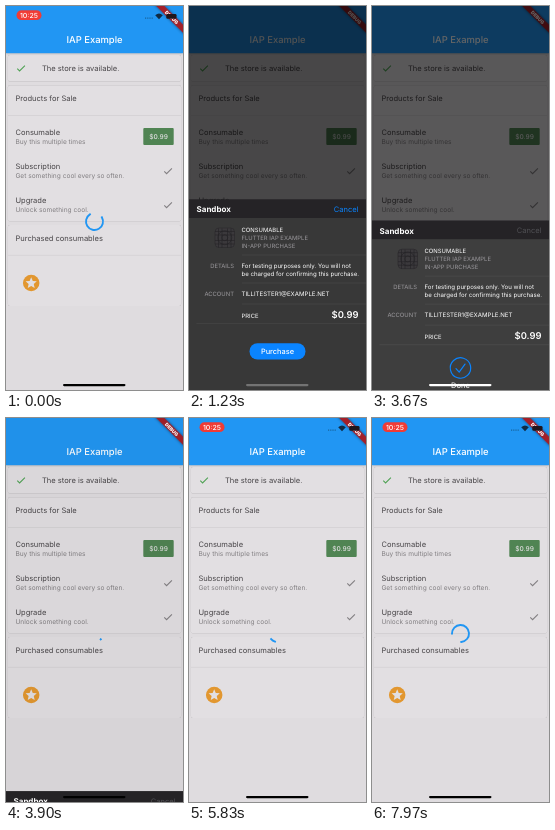
Recreate the animation shown at these times as an HTML page. Size 177 by 384 pixels, loop 8 s.

```html
<!DOCTYPE html>
<html lang="en">
<head>
<meta charset="utf-8">
<title>IAP Example</title>
<style>
  html, body { margin: 0; width: 100%; height: 100%; overflow: hidden; background: #fafafa; }
  svg { display: block; width: 100%; height: 100%; }
  text { font-family: Inter, Roboto, sans-serif; text-rendering: geometricPrecision; }
  .card { fill: #fff; filter: drop-shadow(0 .6px .7px rgba(0, 0, 0, .38)); }
  .title { font-size: 7.55px; fill: #222; }
  .sub { font-size: 6.6px; fill: #757575; }
  .rule { stroke: #dcdcdc; stroke-width: .5; }
  .tick { fill: none; }
  .sheet { font-size: 6.1px; fill: #fff; }
  .caps { font-size: 5.9px; fill: #fff; }
  .dim { fill: #9a989c; }
  .line { stroke: #fff; stroke-opacity: .1; stroke-width: .5; }
  .end { text-anchor: end; }
  .mid { text-anchor: middle; }
</style>
</head>
<body>
<svg viewBox="0 0 177 384">
  <defs>
    <path id="check" d="M4.1 12.7 9 17.6 20.3 6.3" transform="scale(.472) translate(-12 -12)" stroke-width="2.3"/>
  </defs>

  <rect width="177" height="384" fill="#fafafa"/>
  <rect class="card" x="1.9" y="49.1" width="173.2" height="26.4" rx="1.9"/>
  <rect class="card" x="1.9" y="79.3" width="173.2" height="136" rx="1.9"/>
  <rect class="card" x="1.9" y="219" width="173.2" height="81" rx="1.9"/>

  <use href="#check" class="tick" x="15" y="62.3" stroke="#2fa836"/>
  <text class="title" x="36" y="65">The store is available.</text>
  <text class="title" x="9.4" y="95.4">Products for Sale</text>
  <path class="rule" d="M2 109.5H175M2 249.3H175"/>
  <text class="title" x="9.4" y="128.7">Consumable</text>
  <text class="sub" x="9.4" y="137.9">Buy this multiple times</text>
  <text class="title" x="9.4" y="162.7">Subscription</text>
  <text class="sub" x="9.4" y="171.9">Get something cool every so often.</text>
  <text class="title" x="9.4" y="196.7">Upgrade</text>
  <text class="sub" x="9.4" y="205.9">Unlock something cool.</text>
  <rect x="137.3" y="122" width="30.4" height="17" rx="1" fill="#2e7d32"/>
  <text class="mid" x="152.5" y="132.9" font-size="6.6" font-weight="500" fill="#fff">$0.99</text>
  <use href="#check" class="tick" x="162" y="165" stroke="#777"/>
  <use href="#check" class="tick" x="162" y="199" stroke="#777"/>
  <text class="title" x="9.4" y="235.4">Purchased consumables</text>
  <g transform="translate(15.3 267.1) scale(.825)">
    <circle cx="12" cy="12" r="10" fill="#ff9800"/>
    <path fill="#fff" d="M16.2 18 12 15.5 7.8 18l1.1-4.8L5.2 10l4.9-.4L12 5l1.9 4.5 4.9.4-3.7 3.3z"/>
  </g>
  <rect y="47.2" width="177" height="337" fill="#9e969e" fill-opacity=".3"/>
  <path id="spinner" fill="none" stroke="#2196f3" stroke-width="1.9" stroke-linecap="square"/>

  <rect width="177" height="47.2" fill="#2196f3" style="filter:drop-shadow(0 .7px 1px rgba(0,0,0,.3))"/>
  <text class="mid" x="88.5" y="37.4" font-size="9.44" font-weight="500" fill="#fff">IAP Example</text>
  <g transform="translate(177 0) rotate(45)">
    <rect x="-22" y="13.2" width="44" height="5.7" fill="#a51f28" style="filter:drop-shadow(0 0 1.4px rgba(0,0,0,.5))"/>
    <text class="mid" y="17.8" font-size="4.8" font-weight="900" fill="#fff">DEBUG</text>
  </g>
  <g id="status">
    <rect x="10.5" y="4.3" width="25" height="9.8" rx="4.9" fill="#f13b35"/>
    <text class="mid" x="23" y="11.7" font-size="7" font-weight="500" fill="#fff">10:25</text>
    <path d="M139 12.2H147" stroke="#17649f" stroke-width="1.2" stroke-dasharray="1.2 1"/>
    <path d="M149.2 9.3Q153 5.8 156.8 9.3L153 13.2Z" fill="#102b43"/>
    <rect x="160.3" y="8" width="10.2" height="4.8" rx="1.3" fill="#20151c"/>
  </g>

  <rect id="shade" width="177" height="384"/>

  <g id="sheet">
    <rect id="panel" y="211" width="177" height="175"/>
    <rect y="192.8" width="177" height="18.7" fill="#252326"/>
    <path class="line" d="M53 248.5H177M53 276.5H177M53 297.5H177M7.5 317H177"/>
    <text x="7.5" y="205.9" font-size="8" font-weight="700" fill="#fff">Sandbox</text>
    <text id="cancel" class="end" x="169.5" y="205.7" font-size="7.55">Cancel</text>
    <rect x="26" y="221.5" width="19.5" height="19.5" rx="4" fill="#3b393c" stroke="#29272a" stroke-width=".6"/>
    <g fill="none" stroke="#242225" stroke-width=".6">
      <path d="M29.5 222V241M33 222V241M38.5 222V241M42 222V241M26 225H45.5M26 228.5H45.5M26 234H45.5M26 237.5H45.5"/>
      <circle cx="35.75" cy="231.25" r="3"/><circle cx="35.75" cy="231.25" r="7"/>
    </g>
    <text class="caps" x="52.5" y="225.4">CONSUMABLE</text>
    <text class="caps dim" x="52.5" y="233.4">FLUTTER IAP EXAMPLE</text>
    <text class="caps dim" x="52.5" y="241.2">IN-APP PURCHASE</text>
    <text class="caps dim end" x="45" y="261.5">DETAILS</text>
    <text class="sheet" x="52.5" y="261.5">For testing purposes only. You will not</text>
    <text class="sheet" x="52.5" y="269.4">be charged for confirming this purchase.</text>
    <text class="caps dim end" x="45" y="289.5">ACCOUNT</text>
    <text class="sheet" x="52.5" y="289.5">TILLITESTER1@EXAMPLE.NET</text>
    <text class="caps" x="52.5" y="311.3">PRICE</text>
    <text class="end" x="169.5" y="311.6" font-size="9.4" font-weight="600" fill="#fff">$0.99</text>
    <g id="button">
      <rect x="60.5" y="336.7" width="56" height="16.3" rx="8" fill="#0a84ff"/>
      <text class="mid" x="88.5" y="347.5" font-size="7.4" font-weight="500" fill="#fff">Purchase</text>
    </g>
    <g fill="none" stroke="#0a84ff" stroke-width="1.2" stroke-linecap="round">
      <path id="ring"/>
      <path id="tick" d="M84 341 87.2 344.5 93 336.4" pathLength="1" stroke-dasharray="1 2"/>
    </g>
    <text id="done" class="mid" x="88.5" y="360.3" font-size="7.55" fill="#fff">Done</text>
  </g>
  <rect id="home" x="57" y="377.9" width="62.5" height="2.3" rx="1.15"/>
</svg>
<script>
const LOOP = 8000, OPEN = 775, CLOSE = 3639, TAP = 1700;
const FREEZE = 712, RESUME = 4350, CYCLE = 1333;
const el = id => document.getElementById(id);
const set = (id, attributes) => {
  for (const name in attributes) el(id).setAttribute(name, attributes[name]);
};
const clamp = x => Math.min(1, Math.max(0, x));
const ramp = (t, a, b) => clamp((t - a) / (b - a));
const mix = (a, b, k) => a + (b - a) * k;
const grey = v => `rgb(${v},${v},${v})`;

// Critically damped spring, 0 to 1.
function spring(ms) {
  const x = Math.max(0, ms) * .018;
  return 1 - (1 + x) * Math.exp(-x);
}

// cubic-bezier(.4, 0, .2, 1)
function fastOutSlowIn(x) {
  x = clamp(x);
  let lo = 0, hi = 1, s = .5;
  for (let i = 0; i < 18; i++) {
    s = (lo + hi) / 2;
    const bx = 1.2 * s * (1 - s) ** 2 + .6 * s * s * (1 - s) + s ** 3;
    if (bx < x) lo = s; else hi = s;
  }
  return 3 * s * s * (1 - s) + s ** 3;
}

function arc(cx, cy, r, start, sweep) {
  const point = deg => {
    const a = deg * Math.PI / 180;
    return `${cx + r * Math.cos(a)} ${cy + r * Math.sin(a)}`;
  };
  return `M${point(start)}A${r} ${r} 0 ${sweep > 180 ? 1 : 0} 1 ${point(start + sweep)}`;
}

function drawSpinner(t) {
  const time = t > FREEZE && t < RESUME ? FREEZE : t;
  const phase = 3.431 + time / CYCLE;
  const step = Math.floor(phase) % 5, u = phase % 1;
  const head = fastOutSlowIn(u * 2), tail = fastOutSlowIn(u * 2 - 1);
  const start = -90 + tail * 270 + u * 306 - step * 144;
  set('spinner', { d: arc(88.5, 215.5, 8.5, start, Math.max(.3, (head - tail) * 270)) });
}

function drawSheet(t) {
  const shown = t < CLOSE ? spring(t - OPEN) : 1 - spring(t - CLOSE);
  set('sheet', {
    transform: `translate(0 ${190 * (1 - shown)})`,
    visibility: shown < .003 ? 'hidden' : 'visible'
  });
  set('shade', { opacity: .68 * shown });
  // The translucent panel darkens together with the page behind it.
  set('panel', { fill: grey(mix(112, 56, shown)) });

  const tapped = ramp(t, TAP, TAP + 150);
  const drawn = ramp(t, 2300, 2550);
  set('cancel', { fill: tapped > .5 ? '#505054' : '#0a84ff' });
  set('button', { opacity: 1 - tapped });
  set('ring', {
    opacity: tapped,
    d: arc(88.5, 340.3, 10.2, (t - TAP) * .45, mix(280, 359.9, ramp(t, 2150, 2400)))
  });
  set('tick', { opacity: drawn > 0 ? 1 : 0, 'stroke-dashoffset': 1 - drawn });
  set('done', { opacity: ramp(t, 2400, 2650) });
}

function drawSystem(t) {
  set('status', { opacity: t < TAP ? 1 - ramp(t, OPEN, 940) : ramp(t, RESUME, 4650) });
  let level = mix(0, 115, ramp(t, 860, 880));
  level = mix(level, 255, ramp(t, TAP, 3370));
  level = mix(level, 0, ramp(t, 3700, 3880));
  set('home', { fill: grey(level), opacity: clamp(Math.abs(t - 870) / 150) });
}

const origin = performance.now();
function play() {
  const t = (performance.now() - origin) % LOOP;
  drawSpinner(t);
  drawSheet(t);
  drawSystem(t);
  requestAnimationFrame(play);
}
play();
</script>
</body>
</html>
```
